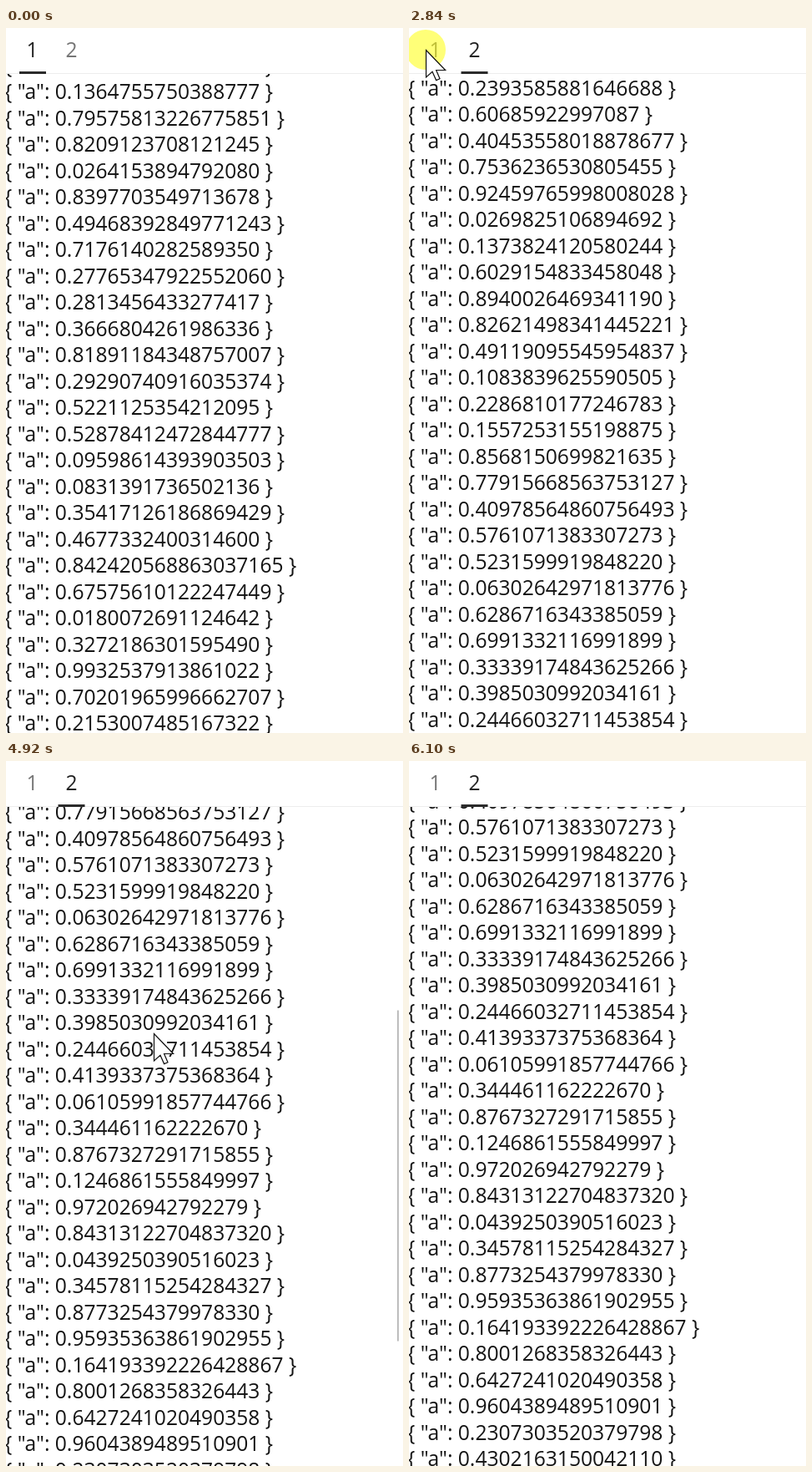
An HTML page for the animation above (6.64 s loop, 476x844 px).

```html
<!DOCTYPE html>
<html lang="en">
<head>
<meta charset="utf-8">
<title>Tabs with scrolling lists</title>
<style>
html, body { margin: 0; width: 100%; height: 100%; overflow: hidden; background: #fff; }
body { position: relative; font: 24.6px/31.5px "Open Sans", "Noto Sans", sans-serif; color: #141414; }
body * { position: absolute; }

.head { inset: 0 0 auto; height: 54px; border-bottom: 1px solid #ededed; }
.tab { left: 15.5px; top: 9.5px; width: 32px; text-align: center; color: #222; }
.tab + .tab { left: 62.5px; }
.ink { left: 16px; top: 52px; width: 31.5px; height: 2.6px; background: #2b2b2b; }

.pane { inset: 55px 0 0; overflow: hidden; }
.rows { left: -2px; top: .5px; }
.rows div { position: static; height: 31.5px; white-space: pre; }
.thumb { left: 469px; top: 57px; width: 2px; height: 396px; background: #bdbdbd; }

.mouse { left: 0; top: 0; }
.press { left: -24px; top: -24px; width: 48px; height: 48px; border-radius: 50%; background: rgba(255, 255, 0, .53); }
.mouse svg { left: 0; top: 0; overflow: visible; }
</style>
</head>
<body>
<div class="head"><div class="tab">1</div><div class="tab">2</div></div>
<div class="ink"></div>
<div class="pane"><div class="rows"></div></div>
<div class="pane"><div class="rows"></div></div>
<div class="thumb"></div>
<div class="mouse">
  <div class="press"></div>
  <svg width="25" height="39"><path d="M.5 .5V33L8 26.2L12.6 36.6L17 34.7L12.6 24.5H23.6Z" fill="#fff" stroke="#111" stroke-width="1.2"/></svg>
</div>
<script>
const LOOP = 6640;
const all = s => [...document.querySelectorAll(s)];
const [ink, thumb, mouse, press] = [".ink", ".thumb", ".mouse", ".press"].map(s => document.querySelector(s));
const tabs = all(".tab"), panes = all(".pane"), rows = all(".rows");

const clamp = v => Math.min(1, Math.max(0, v));
const easeOut = p => 1 - (1 - p) ** 2;
const easeInOut = p => p * p * (3 - 2 * p);
const shift = (el, x, y) => { el.style.transform = `translate(${x}px, ${y}px)`; };

// Each character is a row: how many digits it has beyond ten.
let seed = 7;
const digit = () => (seed = seed * 16807 % 2147483647) % 10;
const fraction = n => Array.from({ length: n }, digit).join("");
["66766676766776776768766676", "647676666776666776676676767566576767866666"].forEach((lengths, i) => {
  rows[i].innerHTML = [...lengths].map(n => `<div>{ "a": 0.${fraction(10 + +n)} }</div>`).join("");
});

// Press and release times; every release switches the tab.
const clicks = [[1140, 1440], [2840, 3050], [3830, 4030]];
// Start, end, x, y of each pointer move.
const moves = [
  [540, 820, 257, 464], [1140, 1790, 88, 353], [1860, 1980, 84, 250], [1980, 2510, 20, 30],
  [2540, 2610, 20, 26], [3200, 3670, 75, 28], [4100, 4650, 177, 326], [5480, 6100, 215, 860]
];
const scroll = { start: 4690, release: 4920, end: 5330, reach: 483, total: 528 };

function pointer(t) {
  let x = 375, y = 846;
  for (const [from, to, nx, ny] of moves) {
    const p = easeOut(clamp((t - from) / (to - from)));
    x += (nx - x) * p;
    y += (ny - y) * p;
  }
  return [x, y];
}

// Wheel: speeding up, then settling exponentially.
function scrolled(t) {
  const { start, release, reach, total } = scroll;
  if (t < release) return reach * clamp((t - start) / (release - start)) ** 1.5;
  return total - (total - reach) * Math.exp((release - t) / 110);
}

function draw() {
  const t = (performance.now() - t0) % LOOP;
  const done = clicks.filter(c => t >= c[1]);
  const active = done.length % 2;

  const slide = done.reduce((v, c, i) => v + (i % 2 ? -1 : 1) * easeInOut(clamp((t - c[1]) / 300)), 0);
  shift(ink, slide * 46.5, 0);
  tabs.forEach((tab, i) => { tab.style.opacity = 1 - .385 * Math.abs(slide - i); });
  panes.forEach((pane, i) => { pane.style.visibility = i === active ? "visible" : "hidden"; });

  const s = Math.round(scrolled(t));
  shift(rows[0], 0, -27);
  shift(rows[1], 0, -s);

  let awake = done.length ? done[done.length - 1][1] : -LOOP;
  if (t >= scroll.start) awake = Math.min(t, scroll.end);
  shift(thumb, 0, active ? s / 2 : 266);
  thumb.style.opacity = clamp(1 - (t - awake - 150) / 450);

  shift(mouse, ...pointer(t));
  press.style.visibility = clicks.some(([down, up]) => t >= down && t < up) ? "visible" : "hidden";
  requestAnimationFrame(draw);
}

const t0 = performance.now();
draw();
</script>
</body>
</html>
```
